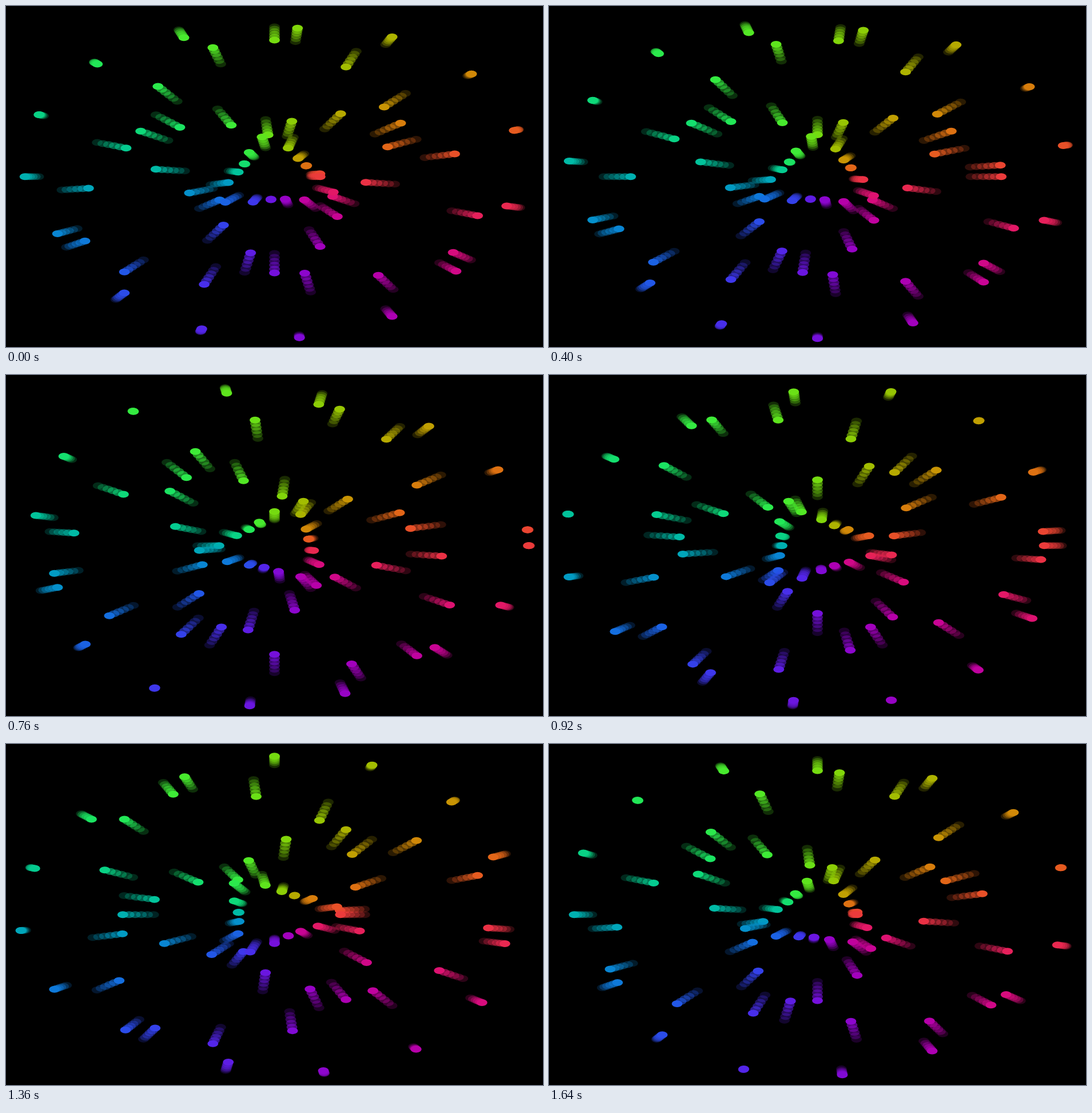
These frames come from a looping animation (939 px wide and 596 px high, 1680 ms). An HTML page with a canvas:

```html
<!DOCTYPE html>
<html lang="en">
<head>
<meta charset="utf-8">
<title>Radial wave</title>
<style>
  html, body { margin: 0; width: 100%; height: 100%; overflow: hidden; background: #000; }
  canvas { display: block; }
</style>
</head>
<body>
<canvas id="stage" width="939" height="596"></canvas>
<script>
const ctx = document.getElementById('stage').getContext('2d');
const TAU = Math.PI * 2;
const COUNT = 64, CYCLES = 15, STEPS = 42, STEP_MS = 40;
const CX = 469.5, CY = 298.2, STRETCH = 1.575;
const MID = 161.2, SWING = 121.8, DOT = 6;
const GHOSTS = 5, LAG = TAU * 0.009;
const START = TAU * (1 / 3 - 0.0025);
const BRIGHTNESS = 0.92;

// Cyclic rainbow built from three shifted squared sines
function rainbow(t) {
  const channel = shift =>
    Math.round(255 * BRIGHTNESS * Math.sin(Math.PI * (0.5 - t + shift)) ** 2);
  return `rgb(${channel(0)},${channel(1 / 3)},${channel(2 / 3)})`;
}

const dots = Array.from({ length: COUNT }, (_, i) => {
  const k = i + 1;
  const angle = TAU * k / COUNT;
  return {
    x: Math.cos(angle) * STRETCH,
    y: -Math.sin(angle),
    phase: START + TAU * CYCLES * k / (COUNT - 1),
    color: rainbow(k / COUNT)
  };
});

function drawDot(dot, phase, alpha) {
  const r = MID + SWING * Math.cos(phase);
  ctx.globalAlpha = alpha;
  ctx.beginPath();
  ctx.ellipse(CX + dot.x * r, CY + dot.y * r, DOT * STRETCH, DOT, 0, 0, TAU);
  ctx.fill();
}

function draw(now) {
  const step = Math.floor(now / STEP_MS) % STEPS;
  const turn = TAU * step / STEPS;
  ctx.globalAlpha = 1;
  ctx.fillStyle = '#000';
  ctx.fillRect(0, 0, 939, 596);
  for (const dot of dots) {
    ctx.fillStyle = dot.color;
    for (let j = GHOSTS; j >= 0; j--) {
      drawDot(dot, dot.phase + turn - j * LAG, j ? 0.7 - j * 0.1 : 1);
    }
  }
}

let origin;
function loop(now) {
  origin ??= now;
  draw(now - origin);
  requestAnimationFrame(loop);
}
requestAnimationFrame(loop);
</script>
</body>
</html>
```
